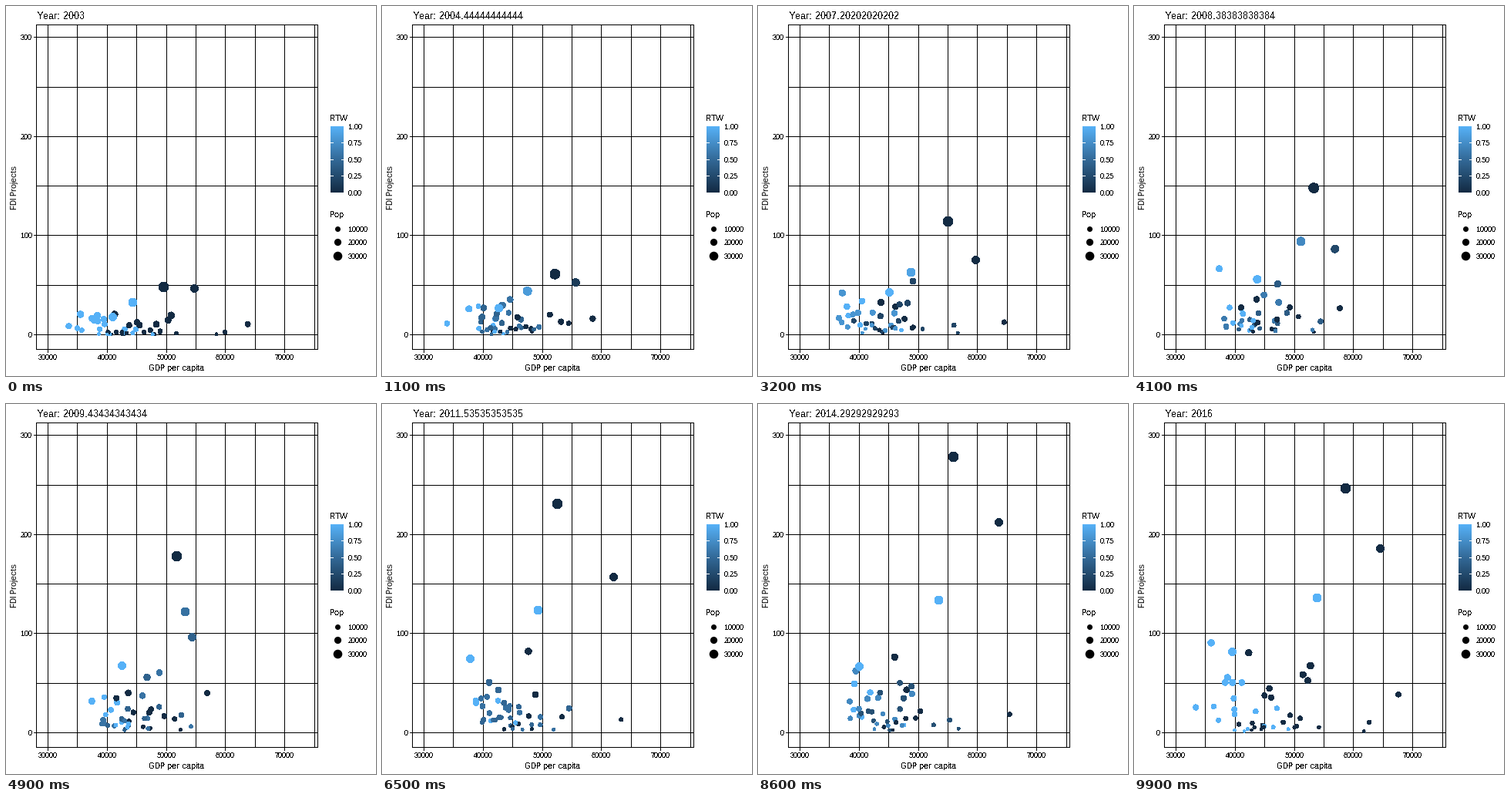
Recreate the animation shown at these times as a matplotlib script. Size 480 px wide and 480 px high, loop 10 s.

```python
import matplotlib.pyplot as plt
import numpy as np
from matplotlib.animation import FuncAnimation
from matplotlib.colors import LinearSegmentedColormap

FRAMES = 100
N_YEARS = 14
N_SMALL = 42
KEYS = 2003 + 13 * np.array([0, 21, 32, 49, 65, 86, 99]) / 99

plt.rcParams.update({
    "font.family": "Liberation Sans",
    "text.antialiased": False,
    "text.hinting": "native",
    "text.hinting_factor": 1,
})
rtw_map = LinearSegmentedColormap.from_list("rtw", ["#132B43", "#336A98", "#56B1F7"])

# One axes in pixel units, y pointing down
fig = plt.figure(figsize=(4.8, 4.8), dpi=100, facecolor="white")
ax = fig.add_axes([0, 0, 1, 1])
ax.axis("off")


def label(x, y, text, size=9, ha="left"):
    return ax.text(x, y, text, fontsize=size * 0.72, ha=ha, va="baseline")


def line(x0, y0, x1, y1, color="black"):
    # Whole pixel numbers: snapping moves the stroke to the pixel centre
    ax.plot([x0, x1], [y0, y1], color=color, lw=0.72, antialiased=False,
            solid_capstyle="butt", snap=True, zorder=1)


def bubbles(x, y, r, color, zorder):
    return ax.scatter(x, y, s=area(r), c=color, lw=0, antialiased=False,
                      snap=False, zorder=zorder)


def area(r):
    return (2 * np.asarray(r) * 0.72) ** 2


# Panel, grid and axes
L, R, T, B = 39, 404, 24, 445
for i in range(10):
    x = round(54 + 38.4 * i)
    line(x, T, x, B)
    if i % 2 == 0:
        line(x, B, x, B + 4)
        label(x, 459, str(30000 + 5000 * i), 9, "center")
for i in range(7):
    y = int(426.5 - 64.3 * i)
    line(L, y, R, y)
    if i % 2 == 0:
        line(L - 3, y, L, y)
        label(34, y + 4, str(50 * i), 9, "right")
for edge in ((L, T, R, T), (L, B, R, B), (L, T, L, B), (R, T, R, B)):
    line(*edge)
label(221, 473, "GDP per capita", 11, "center")
ax.text(11.5, 235.5, "FDI Projects", fontsize=11 * 0.72, rotation=90,
        ha="center", va="center", antialiased=True)

# Legends
label(420, 149, "RTW", 11)
ax.imshow(np.linspace(1, 0, 86)[:, None], cmap=rtw_map, extent=(421, 438, 242, 156),
          aspect="auto", interpolation="nearest", zorder=0)
for i in range(5):
    y = round(156 + 21.4 * i)
    label(444, y + 4, f"{1 - i / 4:.2f}")
    if 0 < i < 4:
        line(421, y, 424, y, "white")
        line(435, y, 438, y, "white")
label(420, 274, "Pop", 11)
for i, r in enumerate((3.5, 4.6, 5.8)):
    y = 288 + 17.5 * i
    bubbles(429.5, y + 0.5, r, "black", 2)
    label(444, int(y) + 5, str(10000 * (i + 1)))
ax.set(xlim=(0, 480), ylim=(480, 0))


def small_states():
    """x, y, radius and RTW of each row per year.

    Rows shift by a few states every year, so dots trade places in between.
    """
    rng = np.random.default_rng(11)
    rank = np.arange(N_SMALL) / N_SMALL
    p = (rng.permutation(N_SMALL) + 0.5) / N_SMALL
    wealth = np.log(p / (1 - p))
    radius = 4.3 - 2.7 * rank
    rtw = wealth + rng.normal(0, 1.2, N_SMALL) < 0
    order = rng.permutation(N_SMALL)
    shift, rows = 0, []
    for u in np.linspace(0, 1, N_YEARS):
        x = (152 + 12 * u) * np.exp((0.14 + 0.08 * rank) * wealth)
        x += rng.normal(0, 3, N_SMALL)
        projects = (25 + 60 * u ** 0.6) * np.exp(-3.5 * rank)
        projects *= rng.lognormal(0, 0.2, N_SMALL)
        y = 426.5 - 1.287 * np.round(projects)
        rows.append(np.column_stack([x.clip(56, 388), y, radius, rtw])[order])
        rows[-1] = np.roll(rows[-1], shift, axis=0)
        shift += rng.integers(1, 4)
    return np.array(rows)


def leader(r, path, rtw):
    xs, ys = zip(*path)
    rtw = np.broadcast_to(rtw, len(KEYS))
    return lambda year: [np.interp(year, KEYS, xs), np.interp(year, KEYS, ys),
                         r, np.interp(year, KEYS, rtw)]


SMALL = small_states()
LEADERS = [
    leader(5.0, [(138, 403), (163, 381), (170, 371), (150, 339),
                 (114, 330), (131, 340), (127, 321)], 1),
    leader(5.5, [(164, 384), (210, 356), (198, 345), (232, 269),
                 (202, 267), (234, 254), (237, 251)], [1, 0.7, 0.9, 0.55, 1, 1, 1]),
    leader(5.0, [(244, 366), (257, 351), (282, 329), (241, 302),
                 (300, 224), (312, 153), (319, 187)], [0, 0.24, 0, 0.43, 0, 0, 0]),
    leader(6.4, [(204, 364), (242, 332), (246, 279), (221, 197),
                 (227, 129), (253, 68), (274, 109)], 0),
]


def state(year):
    i = min(int(year - 2003), N_YEARS - 2)
    u = year - 2003 - i
    small = SMALL[i] * (1 - u) + SMALL[i + 1] * u
    return np.vstack([small, [lead(year) for lead in LEADERS]])


dots = bubbles([], [], [], None, 3)
title = label(40, 17, "", 13)


def update(i):
    year = 2003 + 13 * i / 99
    s = state(year)
    dots.set_offsets(s[:, :2] + 0.5)
    dots.set_sizes(area(s[:, 2]))
    dots.set_facecolors(rtw_map(s[:, 3]))
    title.set_text(f"Year: {year:.15g}")
    return dots, title


anim = FuncAnimation(fig, update, frames=FRAMES, interval=100, repeat=True,
                     repeat_delay=0, blit=False)
plt.show()
```
